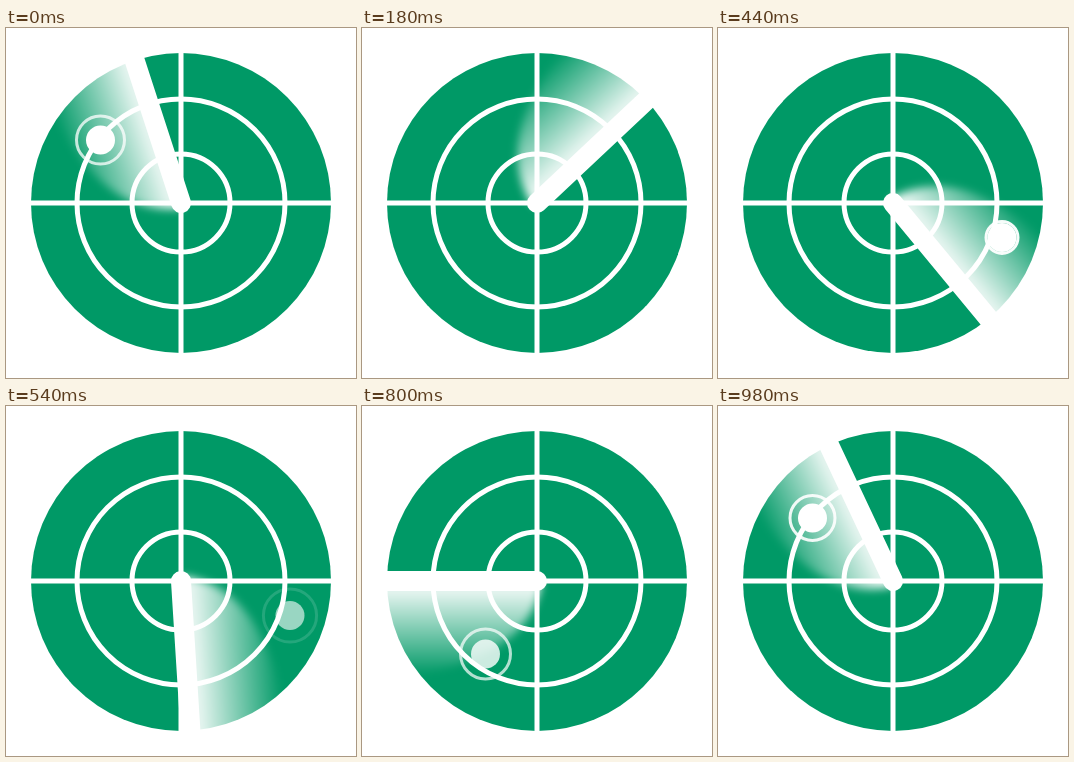
Recreate the animation shown at these times as an HTML page. Size 350 by 350 pixels, loop 1000 ms.

```html
<!DOCTYPE html>
<html lang="en">
<head>
<meta charset="utf-8">
<title>Radar sweep</title>
<style>
  html, body { margin: 0; width: 100%; height: 100%; overflow: hidden; background: #fff; }
  svg { display: block; width: 100%; height: 100%; }
</style>
</head>
<body>
<svg viewBox="0 0 350 350">
  <defs>
    <linearGradient id="fade" gradientUnits="userSpaceOnUse" x1="-9" y1="0" x2="-94" y2="0">
      <stop offset="0" stop-color="#fff" stop-opacity=".92"/>
      <stop offset="1" stop-color="#fff" stop-opacity="0"/>
    </linearGradient>
    <filter id="soft" filterUnits="userSpaceOnUse" x="-130" y="-190" width="150" height="220">
      <feGaussianBlur stdDeviation="4"/>
    </filter>
  </defs>
  <circle cx="175" cy="175" r="150" fill="#009966"/>
  <g id="tail">
    <path d="M-1 5Q-90 -10 -98 -170L-1 -170Z" fill="url(#fade)" filter="url(#soft)"/>
  </g>
  <g fill="none" stroke="#fff" stroke-width="5">
    <circle cx="175" cy="175" r="104"/>
    <circle cx="175" cy="175" r="49"/>
    <path d="M25 175H325M175 25V325"/>
  </g>
  <g id="blips" fill="#fff" stroke="#fff"></g>
  <path id="arm" d="M0 0V-165" stroke="#fff" stroke-width="20" stroke-linecap="round"/>
</svg>
<script>
const LOOP = 1000, STEP = 20;
const NS = 'http://www.w3.org/2000/svg';
const tail = document.getElementById('tail');
const arm = document.getElementById('arm');
const layer = document.getElementById('blips');

// [age in ms, value]
const DOT_ALPHA = [[0, 0], [25, 1], [80, 1], [100, .8], [160, .5], [240, 0]];
const RING_ALPHA = [[0, 0], [25, 1], [60, .9], [80, .75], [100, .7], [150, 0]];
const RING_SIZE = [[0, 16], [40, 16], [60, 22.5], [80, 24], [100, 25], [150, 27]];

function sample(keys, t) {
  const i = keys.findIndex(k => k[0] > t);
  if (i < 0) return keys[keys.length - 1][1];
  if (i === 0) return keys[0][1];
  const [t0, a] = keys[i - 1], [t1, b] = keys[i];
  return a + (b - a) * (t - t0) / (t1 - t0);
}

function circle(x, y, attrs) {
  const el = document.createElementNS(NS, 'circle');
  const all = { cx: x, cy: y, ...attrs };
  for (const k in all) el.setAttribute(k, all[k]);
  return layer.appendChild(el);
}

const blips = [[94.5, 112, 920], [284, 209.5, 400], [123.5, 248, 700]].map(([x, y, start]) => ({
  start,
  dot: circle(x, y, { r: 14.5, stroke: 'none' }),
  ring: circle(x, y, { r: 16, fill: 'none', 'stroke-width': 3 })
}));

function draw(t) {
  const pose = `translate(175 175) rotate(${-18 + 360 * t / LOOP})`;
  tail.setAttribute('transform', pose);
  arm.setAttribute('transform', pose);
  for (const { start, dot, ring } of blips) {
    const age = (t - start + LOOP) % LOOP;
    dot.setAttribute('opacity', sample(DOT_ALPHA, age));
    ring.setAttribute('opacity', sample(RING_ALPHA, age));
    ring.setAttribute('r', sample(RING_SIZE, age));
  }
}

let origin;
function tick(now) {
  origin ??= now;
  const t = Math.max(0, now - origin) % LOOP;
  draw(Math.floor(t / STEP + 1e-4) * STEP);
  requestAnimationFrame(tick);
}
draw(0);
requestAnimationFrame(tick);
</script>
</body>
</html>
```
